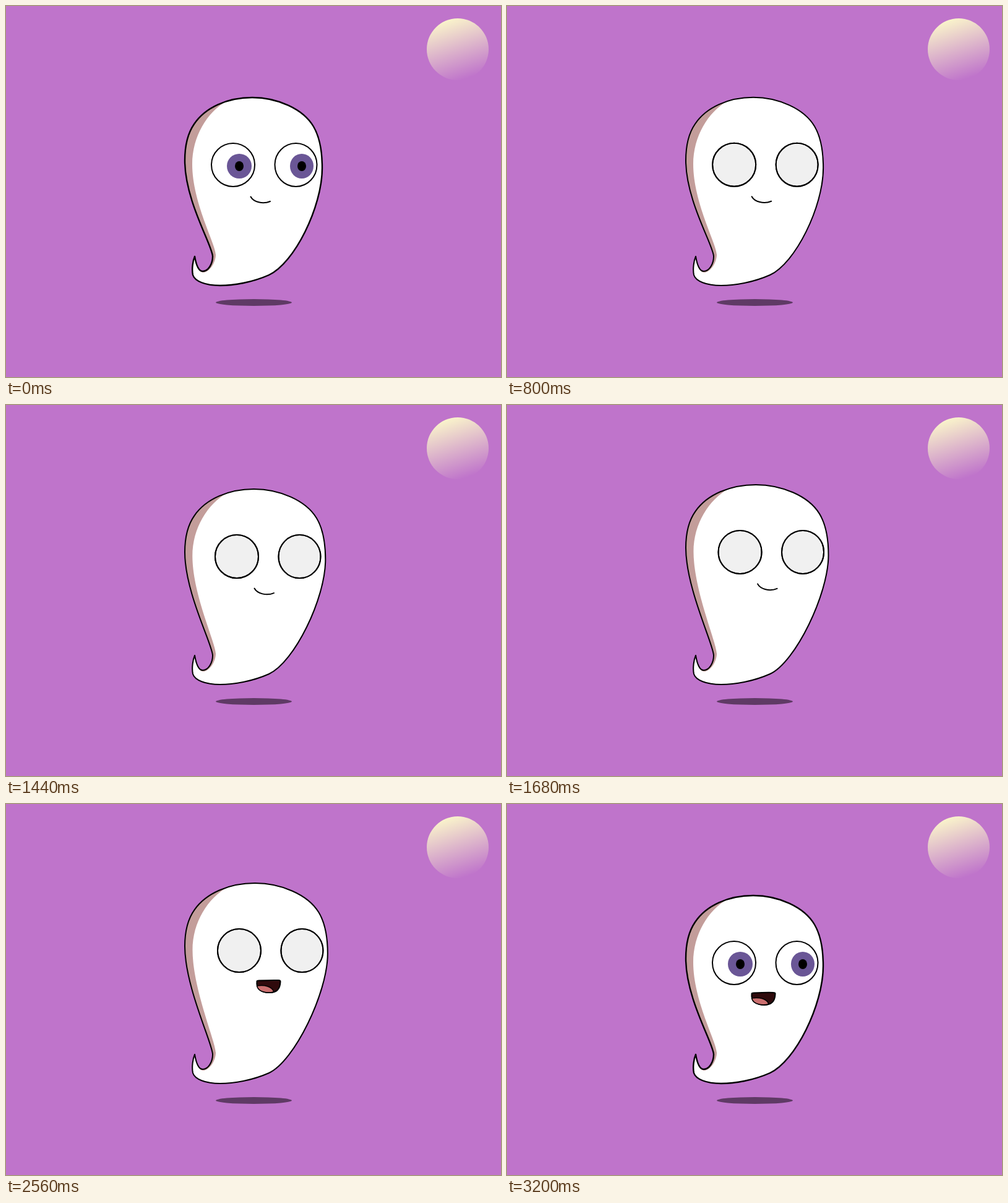
Animation of 800x600 px, one loop 3.84 s. Source, as an HTML page:

```html
<!DOCTYPE html>
<html lang="en">
<head>
<meta charset="utf-8">
<title>Floating ghost</title>
<style>
  html, body { margin: 0; height: 100%; overflow: hidden; background: #bf74cb; }
  svg { display: block; }
  .line { stroke: #000; stroke-width: 2; stroke-linecap: round; stroke-linejoin: round; }
</style>
</head>
<body>
<svg width="800" height="600" viewBox="0 0 800 600">
  <defs>
    <linearGradient id="glow" gradientUnits="userSpaceOnUse" x1="713" y1="20" x2="745" y2="117">
      <stop offset="0" stop-color="#fbf7cb"/>
      <stop offset="1" stop-color="#bf74cb"/>
    </linearGradient>
  </defs>
  <circle cx="730" cy="70" r="50" fill="url(#glow)"/>
  <ellipse cx="400.5" cy="479.5" rx="61.5" ry="5.5" fill="#5f3a65"/>
  <path id="shade" fill="#c39d9a"/>
  <path id="light" fill="#fff"/>
  <path id="outline" class="line" fill="none"/>
  <g id="face">
    <g id="eyes"></g>
    <path id="smile" class="line" fill="none" d="M395.5 308.5C400 317 415 321 427 316"/>
    <g id="laugh" class="line">
      <path fill="#2f0a0c" d="M395.5 307Q395.5 305.5 398 305.5C410 305 422 304.5 431 305Q434 305 433.5 308C433 318 428 325 416 325C403 325 394 319 395.5 307Z"/>
      <path fill="#cb6f6f" stroke-width="1.5" d="M395.5 314C408 312 420 315 423 323.5C414 326 398 325 395.5 314Z"/>
    </g>
  </g>
</svg>
<script>
const LOOP = 3840, STEP = 80;
const $ = id => document.getElementById(id);

// Body curves at rest
const RIGHT = `M398 148C438 148 480 166 497 195C507 212 511 238 511 262
  C511 325 466 416 425 435C398 447 368 452 346 452C322 452 305 445 302 435C300 425 302 412 305 405`;
const BODY = RIGHT + `C307 417 311 429 318 429C327 429 334 417 334 405
  C334 388 289 315 289 250C289 223 295 204 304 191C322 164 358 148 398 148Z`;
const LIGHT = RIGHT + `C306 418 311 431 319 431C330 430 339 414 339 402
  C339 385 301 318 301 256C301 211 325 172 356 154C370 150 384 148 398 148Z`;

const EYES = [{ x: 367, rx: 35, iris: 377, irisRx: 20 }, { x: 468.5, rx: 34, iris: 478, irisRx: 19 }];
const ellipse = (x, y, rx, ry, rest) => `<ellipse cx="${x}" cy="${y}" rx="${rx}" ry="${ry}" ${rest}/>`;
$('eyes').innerHTML = EYES.map(e =>
  ellipse(e.x, 257, e.rx, 35, 'fill="#fff"') +
  ellipse(e.iris, 259, e.irisRx, 20, 'fill="#6a5696"') +
  ellipse(e.iris, 259, 7, 8, 'fill="#000"') +
  '<path class="lid line" fill="#f0f0f0"/>' +
  ellipse(e.x, 257, e.rx, 35, 'fill="none" class="line"')).join('');
const lids = document.querySelectorAll('.lid');

const progress = (t, start, length) => Math.min(1, Math.max(0, (t - start) / length));
const easeInOut = p => p < .5 ? 2 * p * p : 1 - 2 * (1 - p) ** 2;
const move = (t, start) => easeInOut(progress(t, start, 500));

// The upper body stretches up and to the right; the tail stays put
const stretch = (path, lift) => path.replace(/(\d+) (\d+)/g, (pair, x, y) =>
  y < 330 ? `${+x + (x - 289) * .04 * lift} ${y - 20 * lift}` : pair);

// The lid edge swings from the upper arc of the eye to the lower one
function lidPath({ x, rx }, closed) {
  const drop = 70 * closed - 35;
  return `M${x - rx} 257A${rx} 35 0 0 1 ${x + rx} 257` +
    `A${rx} ${Math.max(.01, Math.abs(drop))} 0 0 ${drop > 0 ? 1 : 0} ${x - rx} 257Z`;
}

function draw(t) {
  const lift = (move(t, 740) + move(t, 1285)) / 2 - move(t, 2535);
  const closed = progress(t, 290, 190) - progress(t, 3045, 150);
  const body = stretch(BODY, lift);
  $('shade').setAttribute('d', body);
  $('light').setAttribute('d', stretch(LIGHT, lift));
  $('outline').setAttribute('d', body);
  $('outline').style.strokeWidth = lift ? 2 : 2.4;
  $('face').setAttribute('transform', `translate(${10 * lift} ${-20 * lift})`);
  lids.forEach((lid, i) => {
    lid.setAttribute('d', lidPath(EYES[i], closed));
    lid.style.display = closed > 0 ? '' : 'none';
  });
  const laughing = t >= 2560;
  $('smile').style.display = laughing ? 'none' : '';
  $('laugh').style.display = laughing ? '' : 'none';
}

function tick() {
  const t = performance.now() % LOOP;
  draw(Math.floor(t / STEP) * STEP);
  requestAnimationFrame(tick);
}
tick();
</script>
</body>
</html>
```
